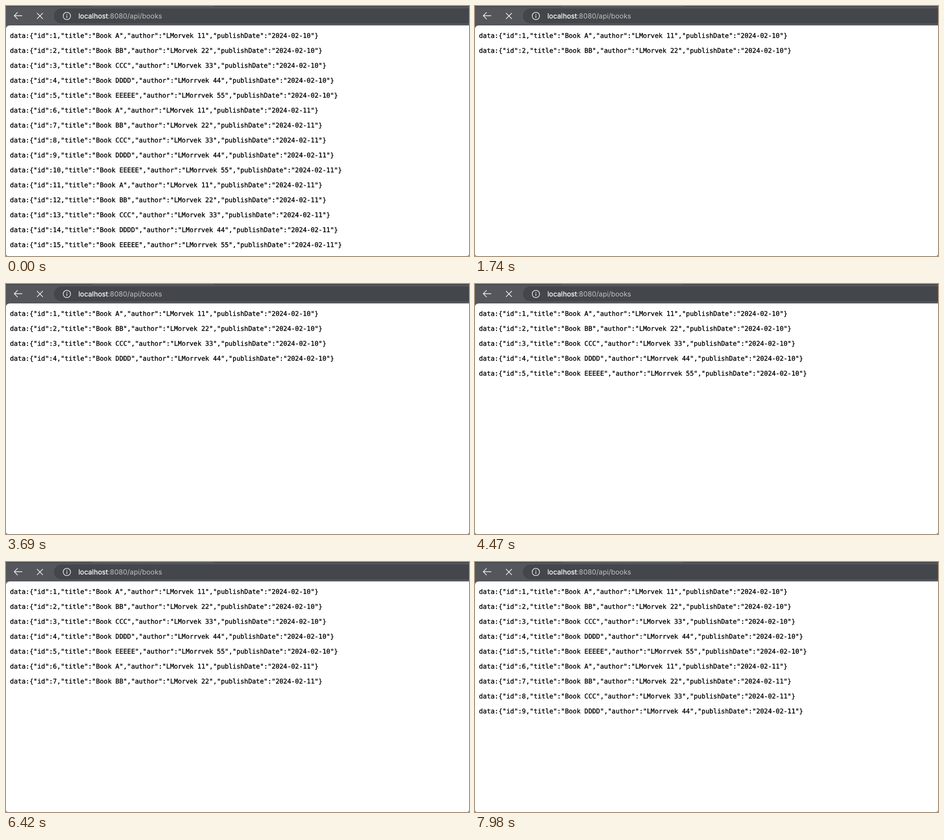
Animation of 928x502 px, one loop 8000 ms. Source, as an HTML page:

```html
<!DOCTYPE html>
<html lang="en">
<head>
<meta charset="utf-8">
<title>Book stream</title>
<style>
  html, body { margin: 0; width: 100%; height: 100%; overflow: hidden; background: #54565b; }
  svg { position: absolute; left: 0; top: 0; }
  svg text { font: 13.9px Inter, "Open Sans", sans-serif; text-rendering: geometricPrecision; }
  pre {
    position: absolute; left: 8px; top: 53px; margin: 0; color: #000;
    font: 13px/15px "DejaVu Sans Mono", "Liberation Mono", monospace;
    text-rendering: geometricPrecision;
    -webkit-text-stroke: 0.35px #000;
  }
</style>
</head>
<body>
<svg width="928" height="502" viewBox="0 0 928 502">
  <rect width="928" height="502" fill="#54565b"/>
  <path d="M0 0H173V1H0ZM417 0H928V1H417Z" fill="#37393d"/>
  <rect x="96" y="5" width="860" height="30" rx="15" fill="#43464b"/>
  <path d="M0 502V47Q0 39 8 39H928V502Z" fill="#fff"/>
  <path d="M0 498V502H4Q0 502 0 498ZM928 498V502H924Q928 502 928 498Z" fill="#54565b"/>
  <g fill="none" stroke="#f2f2f3" stroke-width="1.4" stroke-linecap="round" stroke-linejoin="round">
    <path d="M32 19.5H16.5M23 13L16.5 19.5L23 26"/>
    <path d="M62.5 14.5L73.5 25.5M73.5 14.5L62.5 25.5"/>
    <circle cx="122" cy="20" r="7.4" stroke-width="1.3"/>
    <path d="M122 19.3V23.5" stroke-width="1.3"/>
  </g>
  <circle cx="122" cy="16.6" r="0.95" fill="#f2f2f3"/>
  <text x="145" y="25" fill="#fff"><tspan stroke="#fff" stroke-width="0.25">localhost</tspan><tspan fill="#c0c2c5">:8080/api/books</tspan></text>
</svg>
<pre id="log"></pre>
<script>
  const LOOP = 8000, CLEAR = 150, FULL = 15;
  const arrivals = [180, 1020, 1920, 2820, 3720, 4620, 5520, 6450, 7350];
  const log = document.getElementById('log');

  function record(i) {
    const kind = i % 5;
    const title = 'Book ' + 'ABCDE'[kind].repeat(kind + 1);
    const author = (kind < 3 ? 'LMorvek ' : 'LMorrvek ') + (kind + 1) * 11;
    const publishDate = i < 5 ? '2024-02-10' : '2024-02-11';
    return 'data:' + JSON.stringify({ id: i + 1, title, author, publishDate });
  }

  const rows = Array.from({ length: FULL }, (_, i) => record(i));
  let shown = -1;

  function draw(now) {
    const t = now % LOOP;
    const count = t < CLEAR ? FULL : arrivals.filter(a => a <= t).length;
    if (count !== shown) {
      log.textContent = rows.slice(0, count).join('\n\n');
      shown = count;
    }
  }

  function tick() {
    draw(performance.now());
    requestAnimationFrame(tick);
  }
  tick();
</script>
</body>
</html>
```
